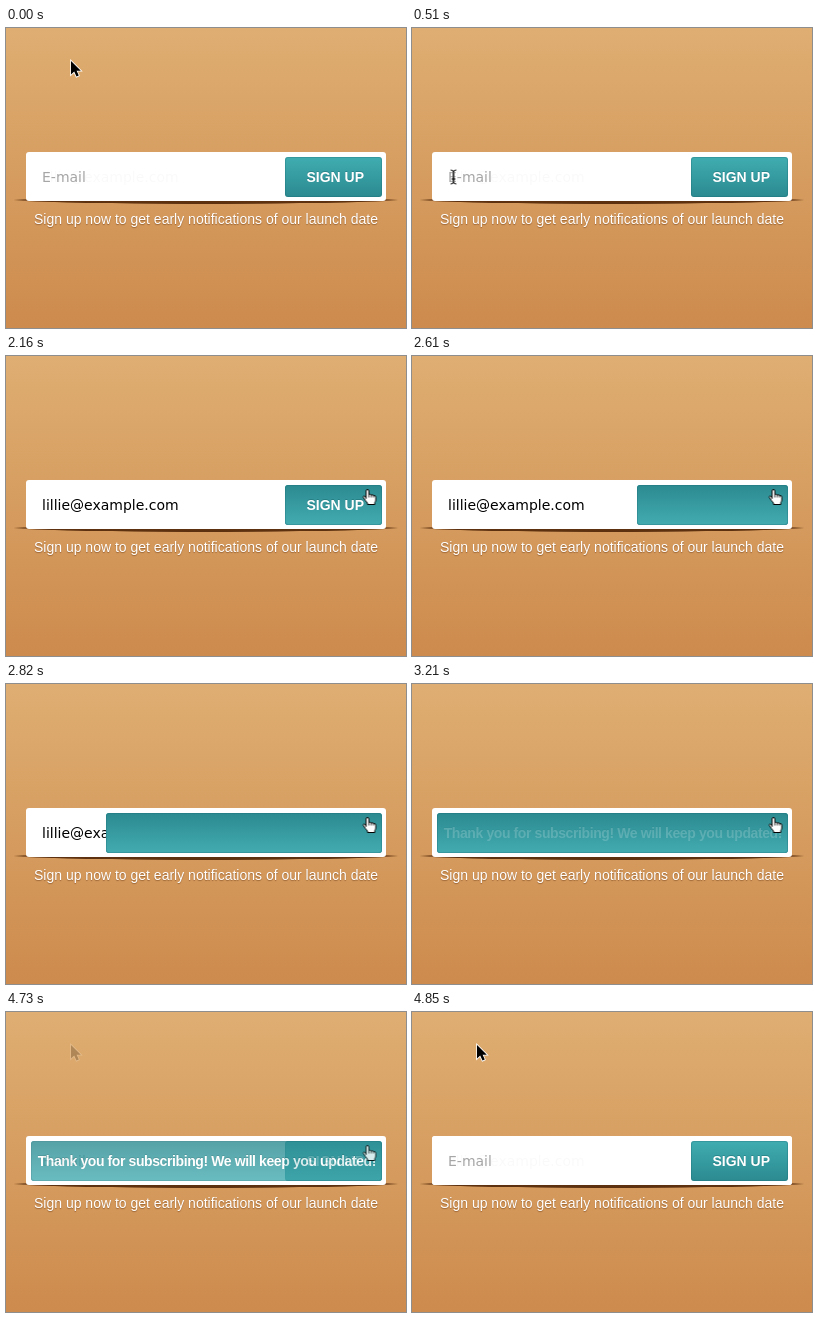
An HTML page for the animation above (4.88 s loop, 400 px wide and 300 px high).

```html
<!DOCTYPE html>
<html lang="en">
<head>
<meta charset="utf-8">
<title>Sign-up form</title>
<style>
  html, body { margin: 0; width: 100%; height: 100%; overflow: hidden; }
  body { background: linear-gradient(#dfae72, #cd8b4d); }

  .stage, .scene { position: absolute; left: 0; top: 0; width: 400px; height: 300px; overflow: hidden; }
  .stage *, .scene { box-sizing: border-box; }
  .stage div, .stage span { position: absolute; white-space: nowrap; }

  .shadow {
    left: 6px; top: 168px; width: 388px; height: 8px;
    background: radial-gradient(closest-side, rgba(80, 38, 8, .9) 88%, rgba(80, 38, 8, .5) 95%, transparent);
  }
  .field { left: 20px; top: 124px; width: 360px; height: 49px; border-radius: 3px; background: #fff; }
  .caption {
    left: 0; top: 181px; width: 400px; text-align: center; color: #fff;
    font: 14px/20px "Liberation Sans", Arial, sans-serif;
    text-shadow: 0 1px 1px rgba(90, 45, 10, .45);
  }

  .entry { left: 36px; top: 129px; font: 14px/40px "DejaVu Sans", sans-serif; color: #000; }
  .hint { color: #a6a6a6; }
  .faint { opacity: .02; }

  .button {
    right: 24px; top: 129px; width: 97px; height: 40px; border-radius: 3px; overflow: hidden;
    background: linear-gradient(#40adb1, #2b8a90);
    box-shadow: inset 0 0 0 1px rgba(25, 105, 112, .3);
    color: #fff; font: bold 14px/40px "Liberation Sans", Arial, sans-serif;
    text-shadow: 0 -1px 0 rgba(0, 60, 65, .25);
  }
  .pressed { left: 0; top: 0; width: 100%; height: 100%; background: linear-gradient(#2b8a90, #43acb1);
    box-shadow: inset 0 0 0 1px rgba(25, 105, 112, .3); border-radius: 3px; }
  .label { right: 18px; top: 0; }
  .thanks { right: 6px; top: 0; letter-spacing: -.4px; }

  svg { position: absolute; left: 0; top: 0; overflow: visible; }
  .pointer { left: 0; top: 0; width: 0; height: 0; transform: translate(65px, 33px); }

  /* One shared clock: 1% = 48.8 ms */
  .live .pointer, .live .arrow, .live .beam, .live .hand, .live .hint, .live .email,
  .live .button, .live .pressed, .live .label, .live .thanks, .restart {
    animation: 4880ms step-end infinite;
  }
  .live .pointer { animation-name: travel; }
  .live .arrow { animation-name: arrow; }
  .live .beam { animation-name: beam; }
  .live .hand { animation-name: hand; }
  .live .hint { animation-name: hint; }
  .live .email { animation-name: email; }
  .live .button { animation-name: widen; }
  .live .pressed { animation-name: press; }
  .live .label { animation-name: label; }
  .live .thanks { animation-name: thanks; }
  .restart { animation-name: restart; }

  @keyframes travel {
    0% { transform: translate(65px, 33px); animation-timing-function: steps(17); }
    10.45% { transform: translate(41.5px, 149px); }
    27.66% { transform: translate(41.5px, 149px); animation-timing-function: steps(27); }
    44.26%, 100% { transform: translate(363.5px, 141px); }
  }
  @keyframes arrow { 0% { opacity: 1; } 8.6%, 100% { opacity: 0; } }
  @keyframes beam { 0% { opacity: 0; } 8.6% { opacity: 1; } 39.34%, 100% { opacity: 0; } }
  @keyframes hand { 0% { opacity: 0; } 39.34%, 100% { opacity: 1; } }
  @keyframes hint { 0% { opacity: 1; } 20.9%, 100% { opacity: 0; } }
  @keyframes email { 0% { opacity: .02; } 20.9%, 100% { opacity: 1; } }
  @keyframes press { 0% { opacity: 0; } 39.34%, 100% { opacity: 1; } }
  @keyframes label {
    0% { opacity: 1; }
    49.18% { opacity: 1; animation-timing-function: steps(4); }
    51.63%, 100% { opacity: 0; }
  }
  @keyframes widen {
    0% { width: 97px; }
    51.63% { width: 97px; animation-timing-function: steps(10); }
    57.78% { width: 276px; animation-timing-function: steps(4); }
    60.24%, 100% { width: 351px; }
  }
  @keyframes thanks {
    0% { opacity: 0; }
    64.54% { opacity: 0; animation-timing-function: steps(11); }
    71.31%, 100% { opacity: 1; }
  }
  @keyframes restart {
    0% { opacity: 0; }
    96.31% { opacity: 0; animation-timing-function: steps(5); }
    99.38%, 100% { opacity: 1; }
  }
</style>
</head>
<body>
<svg width="0" height="0">
  <defs>
    <path id="arrow" d="M0 0V13.6L3.2 10.6 5.5 15.6 7.8 14.6 5.6 9.8H9.8Z"
      fill="#000" stroke="#fff" stroke-width="1.6" paint-order="stroke"/>
    <path id="beam" fill="none"
      d="M-2.8-7Q0-7 0-4.8V4.8Q0 7-2.8 7M2.8-7Q0-7 0-4.8V4.8Q0 7 2.8 7M-2 2H2"/>
    <g id="hand" stroke="#000" stroke-linejoin="round">
      <path fill="#fff" d="M-3.4 1.5V-6q0-1.5 1.4-1.5T-.6-6v3.6q1.4-.8 2.4.4 1.6-.6 2.3.5 2.2-.3 2.2 1.6V3q0 1.3-1 2.6V7.5H-2V6Q-4 4-6 .6q-.6-1.4.6-1.6 1 0 2 2z"/>
      <path fill="none" stroke-width=".8" d="M-.6-2.4V.5M1.8-2V.5M4.1-1.5V.5"/>
    </g>
  </defs>
</svg>

<div class="stage">
  <div class="shadow"></div>
  <div class="caption">Sign up now to get early notifications of our launch date</div>

  <div class="scene live">
    <div class="field"></div>
    <span class="entry email">lillie@example.com</span>
    <span class="entry hint">E-mail</span>
    <div class="button">
      <div class="pressed"></div>
      <span class="label">SIGN UP</span>
      <span class="thanks">Thank you for subscribing! We will keep you updated!</span>
    </div>
    <div class="pointer">
      <svg width="1" height="1">
        <use class="arrow" href="#arrow"/>
        <g class="beam">
          <use href="#beam" stroke="#fff" stroke-width="2.6"/>
          <use href="#beam" stroke="#000"/>
        </g>
        <use class="hand" href="#hand"/>
      </svg>
    </div>
  </div>

  <div class="scene restart">
    <div class="field"></div>
    <span class="entry faint">lillie@example.com</span>
    <span class="entry hint">E-mail</span>
    <div class="button"><span class="label">SIGN UP</span></div>
    <div class="pointer"><svg width="1" height="1"><use href="#arrow"/></svg></div>
  </div>
</div>
</body>
</html>
```
